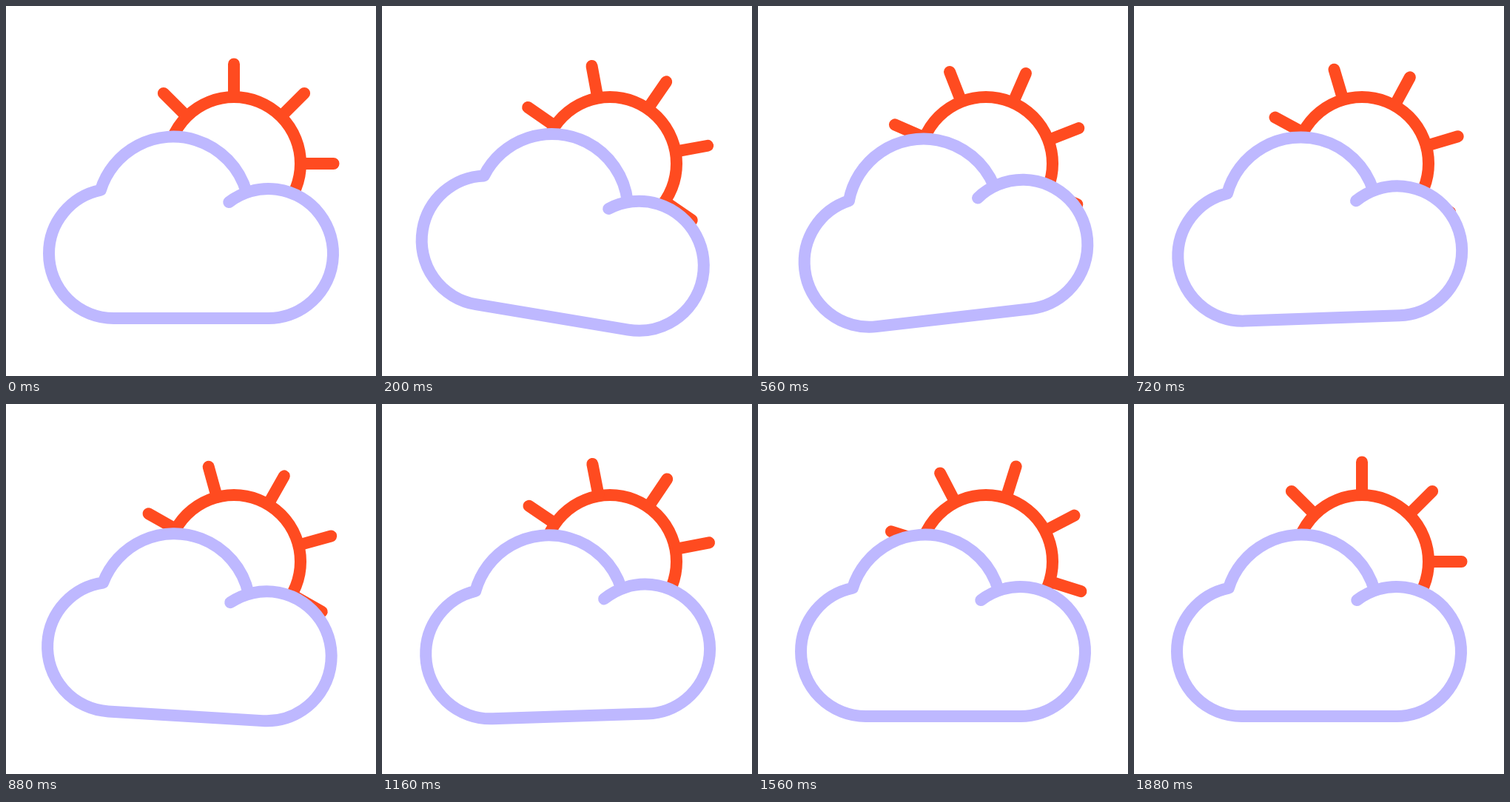
An HTML page with a canvas that plays this animation: 500x500 px, repeating every 2000 ms.

```html
<!DOCTYPE html>
<html lang="en">
<head>
<meta charset="utf-8">
<title>Sun and cloud</title>
<style>
  html, body { margin: 0; width: 100%; height: 100%; overflow: hidden; background: #fff; }
  canvas { display: block; width: 500px; height: 500px; }
</style>
</head>
<body>
<canvas id="stage" width="500" height="500"></canvas>
<script>
const ctx = document.getElementById('stage').getContext('2d');
const LOOP = 2000, STEP = 40;
const SUN = '#ff4b20', CLOUD = '#beb8ff';

// [time in ms, degrees]
const spin = [[0, 0], [360, -28], [560, -66.4], [880, -150.5], [1160, -236],
  [1560, -342.5], [1680, -358], [1780, -369.5], [1880, -360]];
const sway = [[0, 0], [340, 15], [580, -7], [870, 3.5], [1150, -1.85], [1440, 0]];

// Slope at a key: flat at turning points and ends
function slope(keys, i) {
  const a = keys[i - 1], b = keys[i], c = keys[i + 1];
  if (!a || !c || (b[1] - a[1]) * (c[1] - b[1]) <= 0) return 0;
  return (c[1] - a[1]) / (c[0] - a[0]);
}

// Smooth curve through the keys, in radians
function angleAt(keys, t) {
  const rad = Math.PI / 180, last = keys.length - 1;
  if (t >= keys[last][0]) return keys[last][1] * rad;
  let i = 0;
  while (t >= keys[i + 1][0]) i++;
  const [t0, a] = keys[i], [t1, b] = keys[i + 1];
  const d = t1 - t0, u = (t - t0) / d, v = 1 - u;
  const ease = u * u * (3 - 2 * u);
  const bend = d * u * v * (slope(keys, i) * v - slope(keys, i + 1) * u);
  return (a + (b - a) * ease + bend) * rad;
}

function turn(x, y, angle) {
  ctx.translate(x, y);
  ctx.rotate(angle);
  ctx.translate(-x, -y);
}

function drawSun(angle) {
  const x = 308, y = 213;
  ctx.strokeStyle = SUN;
  ctx.beginPath();
  ctx.arc(x, y, 90, 0, Math.PI * 2);
  ctx.stroke();

  ctx.save();
  turn(309, 213.5, angle);
  ctx.beginPath();
  for (let i = 0; i < 8; i++) {
    const c = Math.cos(i * Math.PI / 4), s = Math.sin(i * Math.PI / 4);
    ctx.moveTo(x + 92 * c, y + 92 * s);
    ctx.lineTo(x + 134.5 * c, y + 134.5 * s);
  }
  ctx.stroke();
  ctx.restore();
}

function drawCloud(angle) {
  ctx.save();
  turn(250, 299.5, angle);
  ctx.beginPath();
  ctx.arc(354.5, 334.5, 87.5, Math.atan2(-68.5, -52.5), Math.PI / 2);
  ctx.arc(145.5, 334.5, 87.5, Math.PI / 2, Math.atan2(-85.7, -17.5));
  ctx.arc(226, 279.4, 102.8, Math.atan2(-30.6, -98), Math.atan2(-27.5, 99));
  ctx.fillStyle = '#fff';
  ctx.fill();
  ctx.strokeStyle = CLOUD;
  ctx.stroke();
  ctx.restore();
}

function draw(t) {
  ctx.fillStyle = '#fff';
  ctx.fillRect(0, 0, 500, 500);
  ctx.lineWidth = 16;
  ctx.lineCap = ctx.lineJoin = 'round';
  drawSun(angleAt(spin, t));
  drawCloud(angleAt(sway, t));
}

const start = performance.now();
function tick() {
  const t = (performance.now() - start) % LOOP;
  draw(Math.floor(t / STEP) * STEP);
  requestAnimationFrame(tick);
}
tick();
</script>
</body>
</html>
```
